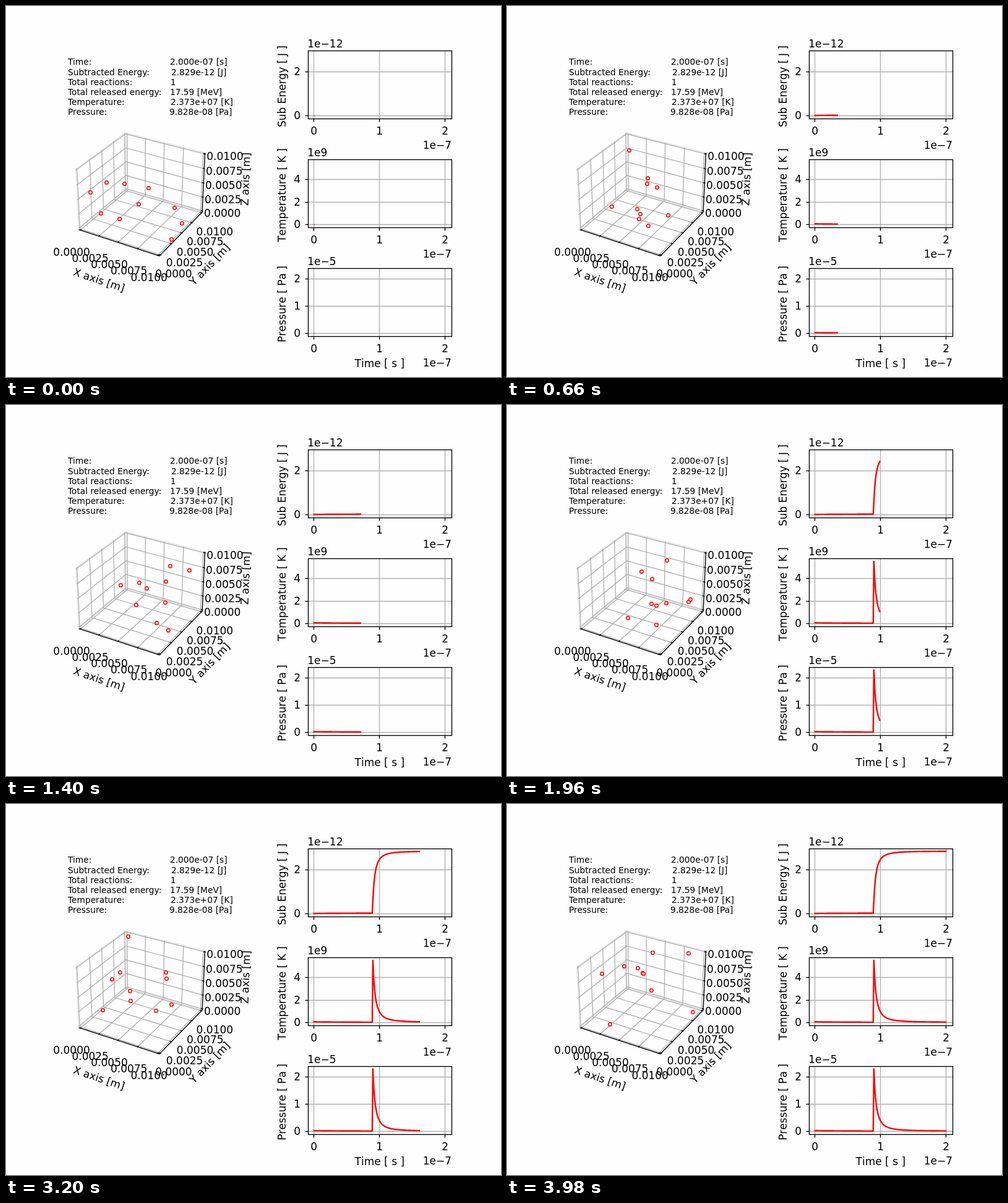
An HTML page that plays this animation: 800x600 px, repeating every 4 s.

```html
<!DOCTYPE html>
<html lang="en">
<head>
<meta charset="utf-8">
<title>Particles in a box</title>
<style>
html, body { margin: 0; width: 100%; height: 100%; overflow: hidden; background: #fefefe; }
svg { display: block; width: 800px; height: 600px; font: 17px "DejaVu Sans", sans-serif; font-kerning: none; }
.info { font-size: 13.75px; font-kerning: normal; }
.grid, .axis { fill: none; stroke: #b0b0b0; stroke-width: 1.35; }
.axis { stroke: #000; }
.pane { fill: none; stroke: #e4e4e4; stroke-width: 1.35; }
.curve { fill: none; stroke: #f00; stroke-width: 2.4; stroke-linecap: square; stroke-linejoin: round; }
.dot { fill: #fff; stroke: #f00; stroke-width: 1.5; }
</style>
</head>
<body>
<svg id="stage" viewBox="0 0 800 600"></svg>
<script>
const stage = document.getElementById('stage');
const STEP = 20, STEPS = 200, REACTION = 90;

function add(tag, attrs, content) {
  const el = document.createElementNS('http://www.w3.org/2000/svg', tag);
  for (const k in attrs) el.setAttribute(k, attrs[k]);
  if (content) el.textContent = content;
  return stage.appendChild(el);
}
const line = (cls, pts) =>
  add('polyline', { class: cls, points: pts.map(p => p.join()).join(' ') });
const text = (s, x, y, anchor = 'start', cls = '') =>
  add('text', { x, y: Math.round(y), 'text-anchor': anchor, class: cls }, s);
const turned = (s, x, y, deg) =>
  add('text', { 'text-anchor': 'middle', y: 6, transform: `translate(${x} ${y}) rotate(${deg})` }, s);

// Perspective camera: elevation 30, azimuth -60, distance 10
const HALF = [0.5952, 0.5952, 0.4464];
const U = [0.866, 0.5, 0], V = [-0.25, 0.433, 0.866], W = [0.433, -0.75, 0.5];
const CX = 219.2, CY = 299.7, SCALE = 125.4;
const dot3 = (a, b) => a[0] * b[0] + a[1] * b[1] + a[2] * b[2];

function project(n) {
  const d = n.map((c, i) => (2 * c - 1) * HALF[i]);
  const k = SCALE * 10 / (10 - dot3(d, W));
  return [CX + k * dot3(d, U), CY - k * dot3(d, V)];
}

// Point of the box seen at a stage position, at depth fraction f of the sight line
function unproject(x, y, f) {
  const inside = [];
  for (let s = -1; s <= 1; s += 0.01) {
    const k = (1 - s / 10) / SCALE;
    const n = HALF.map((h, i) =>
      (((x - CX) * k * U[i] + (CY - y) * k * V[i] + s * W[i]) / h + 1) / 2);
    if (n.every(c => c >= 0 && c <= 1)) inside.push(n);
  }
  return inside[Math.floor(f * inside.length)];
}

// Box
const ticks = [0.02, 0.26, 0.5, 0.74, 0.98];
const line3 = (cls, ...pts) => line(cls, pts.map(project));
line3('pane', [0, 0, 0], [0, 1, 0], [0, 1, 1], [0, 0, 1], [0, 0, 0]);
line3('pane', [0, 1, 1], [1, 1, 1], [1, 1, 0], [0, 1, 0]);
for (const t of ticks) {
  line3('grid', [t, 0, 0], [t, 1, 0], [t, 1, 1]);
  line3('grid', [1, t, 0], [0, t, 0], [0, t, 1]);
  line3('grid', [0, 0, t], [0, 1, t], [1, 1, t]);
}
line3('axis', [0, 0, 0], [1, 0, 0], [1, 1, 0], [1, 1, 1]);
const IN = 0.018, OUT = 0.01;
for (const t of ticks) {
  line3('axis', [t, IN, 0], [t, -OUT, 0]);
  line3('axis', [1 - IN, t, 0], [1 + OUT, t, 0]);
  line3('axis', [1 - IN, 1, t], [1 + OUT, 1, t]);
}

// Particles start at these stage positions and bounce off the walls
const STARTS = '136,301 162,285 191,287 230,294 214,320 153,335 183,344 272,326 284,351 267,377';
const SPEED = 0.05;
let seed = 11;
const random = () => (seed = seed * 16807 % 2147483647) / 2147483647;

function fold(q) {
  const m = ((q % 2) + 2) % 2;
  return m > 1 ? 2 - m : m;
}
const particles = STARTS.split(' ').map(p => {
  const from = unproject(...p.split(',').map(Number), 0.1 + 0.8 * random());
  const rise = 2 * random() - 1, turn = 2 * Math.PI * random();
  const flat = Math.sqrt(1 - rise * rise);
  const speed = SPEED * (0.6 + 0.8 * random());
  return {
    from,
    move: [flat * Math.cos(turn), flat * Math.sin(turn), rise].map(c => c * speed),
    el: add('circle', { class: 'dot', r: 2.75 })
  };
});

ticks.forEach((t, i) => {
  const label = (0.0025 * i).toFixed(4);
  const put = (n, dx, dy) => {
    const [x, y] = project(n);
    text(label, x + dx, y + dy + 6, 'middle');
  };
  put([t, 0, 0], -14, 35.5);
  put([1, t, 0], 21.5, 30.5);
  put([1, 1, t], 32.5, 3.7);
});
turned('X axis [m]', 150.5, 443, 18.5);
turned('Y axis [m]', 329, 418, -46);
turned('Z axis [m]', 387, 280, -88);

// Read-out
[
  ['Time:', '2.000e-07 [s]', 265],
  ['Subtracted Energy:', '2.829e-12 [J]', 267],
  ['Total reactions:', '1', 265.7],
  ['Total released energy:', '17.59 [MeV]', 265],
  ['Temperature:', '2.373e+07 [K]', 266],
  ['Pressure:', '9.828e-08 [Pa]', 264]
].forEach(([name, value, x], i) => {
  const y = 95.4 + 16.2 * i;
  text(name, 100, y, 'start', 'info');
  text(value, x, y, 'start', 'info');
});

// Temperature in 1e9 K; the other two quantities follow from it
function temperature(n) {
  return n < REACTION ? 0.04 * Math.exp(-n / 50) : 5.5 / (1 + (n - REACTION) / 7) ** 2;
}
const energy = n => (n < REACTION ? 0.0165 : 2.839) - 0.41 * temperature(n);
const pressure = n => 0.415 * temperature(n);

const L = 488.5, R = 720.5, X0 = 497.8, DX = 1.057;
function chart({ top, name, power, zero, unit, marks, f }) {
  const bottom = top + 110;
  for (let i = 0; i < 3; i++) {
    const x = 497.5 + 106 * i;
    line('grid', [[x, top], [x, bottom]]);
    line('axis', [[x, bottom], [x, bottom + 5]]);
    text(String(i), x + 0.2, bottom + 25, 'middle');
  }
  for (const m of marks) {
    const y = Math.round(zero - m * unit) + 0.5;
    line('grid', [[L, y], [R, y]]);
    line('axis', [[L - 5, y], [L, y]]);
    text(String(m), 476.2, y + 5.5, 'end');
  }
  const start = add('rect', { x: 497, y: zero, width: 2, height: 1, fill: '#f00' });
  const curve = add('polyline', { class: 'curve' });
  add('rect', { class: 'axis', x: L, y: top, width: R - L, height: 110 });
  text(power, 487.3, top - 5.5);
  text('1e\u22127', 720, bottom + 48.4, 'end');
  turned(name, 446.2, top + 57.5, -90);
  const pts = [];
  for (let n = 0; n <= STEPS; n++)
    pts.push((X0 + DX * n).toFixed(2) + ',' + (zero - unit * f(n)).toFixed(2));
  return step => {
    start.setAttribute('visibility', step ? 'hidden' : 'visible');
    curve.setAttribute('points', step ? pts.slice(0, step + 2).join(' ') : '');
  };
}
const charts = [
  { top: 72.5, name: 'Sub Energy [ J ]', power: '1e\u221212', zero: 177, unit: 35.5, marks: [0, 2], f: energy },
  { top: 248.5, name: 'Temperature [ K ]', power: '1e9', zero: 353, unit: 18.2, marks: [0, 2, 4], f: temperature },
  { top: 424.5, name: 'Pressure [ Pa ]', power: '1e\u22125', zero: 529, unit: 44, marks: [0, 1, 2], f: pressure }
].map(chart);
text('Time [ s ]', 603.8, 584, 'middle');

function draw(step) {
  charts.forEach(update => update(step));
  for (const { from, move, el } of particles) {
    const [x, y] = project(from.map((a, j) => fold(a + move[j] * step)));
    el.setAttribute('cx', Math.round(x) + 0.5);
    el.setAttribute('cy', Math.round(y) + 0.5);
  }
}

const begin = performance.now();
function tick() {
  draw(Math.floor((performance.now() - begin) / STEP) % STEPS);
  requestAnimationFrame(tick);
}
draw(0);
requestAnimationFrame(tick);
</script>
</body>
</html>
```
